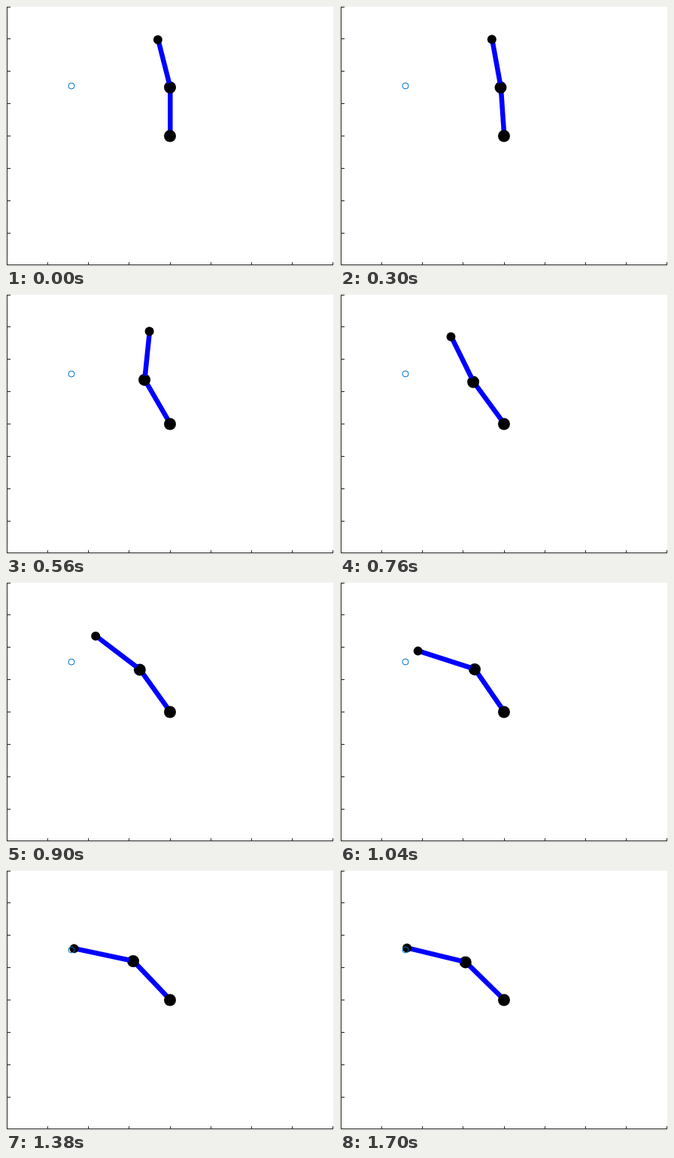
These frames come from a looping animation (436 px wide and 345 px high, 1720 ms). An HTML page with a canvas:

```html
<!DOCTYPE html>
<html lang="en">
<head>
<meta charset="utf-8">
<title>Two-link arm</title>
<style>
html, body { margin: 0; width: 100%; height: 100%; overflow: hidden; background: #f0f0f0; }
canvas { display: block; }
</style>
</head>
<body>
<canvas id="stage" width="436" height="345"></canvas>
<script>
const ctx = document.getElementById('stage').getContext('2d');
const LOOP = 1720, STEP = 20;
const UNIT_X = 54.2, UNIT_Y = 43, LINK = 1.5;
const BASE = { x: 218, y: 172.5 };

// Key poses: link angles in radians, leftward from vertical
const times = [0, 0.3, 0.56, 0.76, 1.04, 1.38, 1.7];
const lower = [0, 0.055, 0.431, 0.527, 0.5, 0.646, 0.681];
const upper = [0.2, 0.144, -0.081, 0.373, 1.185, 1.31, 1.275];

const span = i => times[i + 1] - times[i];
const slope = (keys, i) => (keys[i + 1] - keys[i]) / span(i);

// Velocity at a key pose; the arm rests at both ends
function speed(keys, i) {
  if (i === 0 || i === keys.length - 1) return 0;
  const before = span(i - 1), after = span(i);
  return (after * slope(keys, i - 1) + before * slope(keys, i)) / (before + after);
}

// Cubic Hermite interpolation between key poses
function angleAt(keys, t) {
  let i = 0;
  while (i < keys.length - 2 && t > times[i + 1]) i++;
  const h = span(i), u = (t - times[i]) / h, w = 1 - u;
  return w * w * ((1 + 2 * u) * keys[i] + u * h * speed(keys, i)) +
         u * u * ((3 - 2 * u) * keys[i + 1] - w * h * speed(keys, i + 1));
}

function linkEnd(from, angle) {
  return {
    x: from.x - LINK * UNIT_X * Math.sin(angle),
    y: from.y - LINK * UNIT_Y * Math.cos(angle)
  };
}

function circle(p, r) {
  ctx.beginPath();
  ctx.arc(p.x, p.y, r, 0, 2 * Math.PI);
}

// A bar with a round joint at each end
function drawLink(a, b, r) {
  ctx.strokeStyle = '#00f';
  ctx.lineWidth = 6.5;
  ctx.beginPath();
  ctx.moveTo(a.x + 0.3, a.y - 0.3);
  ctx.lineTo(b.x + 0.3, b.y - 0.3);
  ctx.stroke();
  ctx.fillStyle = '#000';
  for (const p of [a, b]) {
    circle(p, r);
    ctx.fill();
  }
}

function drawAxes() {
  ctx.fillStyle = '#f0f0f0';
  ctx.fillRect(0, 0, 436, 345);
  ctx.fillStyle = '#fff';
  ctx.fillRect(1, 1, 434, 343);
  ctx.fillStyle = '#262626';
  ctx.fillRect(1, 1, 1, 343);
  ctx.fillRect(1, 343, 434, 1);
  for (let i = 0; i < 8; i++) {
    ctx.fillRect(Math.floor(1.2 + UNIT_X * (i + 1)), 340, 1, 3);
    ctx.fillRect(1, Math.max(1, UNIT_Y * i), 5, 1);
  }
}

function draw(ms) {
  const t = Math.floor(ms / STEP) * STEP / 1000;
  const elbow = linkEnd(BASE, angleAt(lower, t));
  const tip = linkEnd(elbow, angleAt(upper, t));

  drawAxes();
  drawLink(BASE, elbow, 8);
  drawLink(elbow, tip, 6);

  ctx.strokeStyle = '#0072bd';
  ctx.lineWidth = 1;
  circle({ x: 87, y: 106 }, 4);
  ctx.stroke();
}

const start = performance.now();
function tick() {
  draw((performance.now() - start) % LOOP);
  requestAnimationFrame(tick);
}
tick();
</script>
</body>
</html>
```
